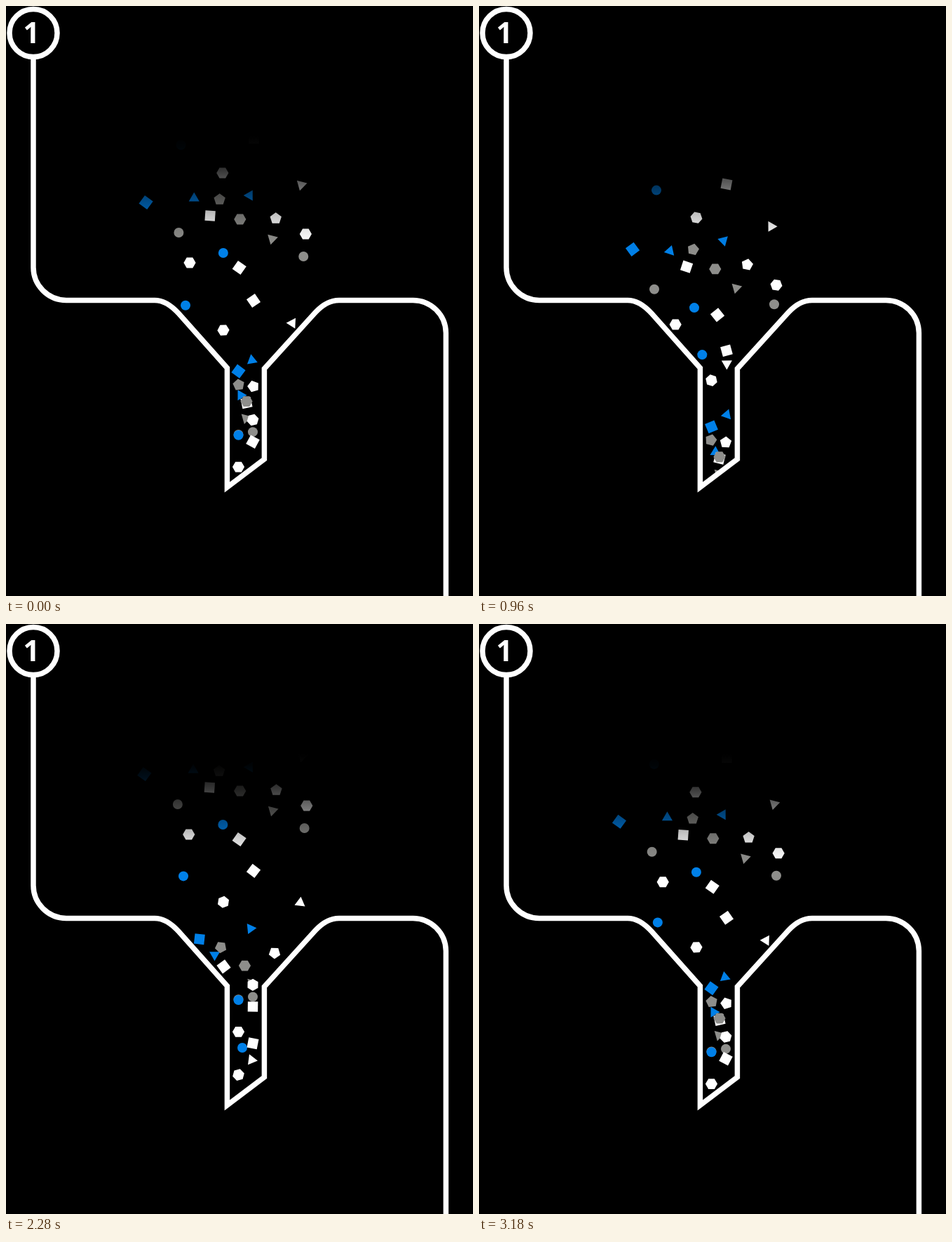
These frames come from a looping animation (666x841 px, 3.24 s). An HTML page with a canvas:

```html
<!DOCTYPE html>
<html lang="en">
<head>
<meta charset="utf-8">
<title>Funnel</title>
<style>
  html, body { margin: 0; width: 100%; height: 100%; overflow: hidden; background: #000; }
  canvas { display: block; }
</style>
</head>
<body>
<canvas id="stage" width="666" height="841"></canvas>
<script>
const ctx = document.getElementById('stage').getContext('2d');
const STEP = 60, STEPS = 54;
const WHITE = '#fff', BLUE = '#0080e8', GRAY = '#8e8e8b';

const circle = { sides: 0, r: 7, angle: 0 };
const tri = { sides: 3, r: 8.7, angle: 104 };
const square = { sides: 4, r: 10.2, angle: 45 };
const penta = { sides: 5, r: 8.6, angle: -90 };
const hexa = { sides: 6, r: 8.6, angle: 0 };

// Speeds are in pixels per step, spin in degrees per step.
const START = 7, END = 112;       // shapes drift in until START, then fall and spin
const ENTRY = 3.57, RISE = 4.55;  // speed just before START and earlier
const NECK = 510, FLOW = 4.95;    // top of the spout and the speed inside it
const GAP = 20;                   // clearance from the sloping walls
const LEFT = 331.5, INNER = 337, MID = 343, RIGHT = 352;

const wallLeft = y => 246 + (y - 438) * 0.885;
const wallRight = y => 441 - (y - 436) * 0.901;
const clamp = (v, lo, hi) => Math.max(lo, Math.min(hi, v));

// Fall freely, slide along a wall when touching it, then flow down a lane.
function trace(d) {
  let { x, y } = d;
  const path = [];
  for (let u = START; u <= END; u++) {
    path.push({ x, y });
    x += (d.lane - x) * d.drift;
    const free = x;
    x = clamp(x, Math.min(d.lane, wallLeft(y) + GAP), Math.max(d.lane, wallRight(y) - GAP));
    y += y > NECK ? FLOW : x !== free ? d.slide : d.fall;
    x = clamp(x, Math.min(d.lane, wallLeft(y) + GAP), Math.max(d.lane, wallRight(y) - GAP));
  }
  return path;
}

const drops = [];
function drop(shape, color, x, y, lane, fall, options) {
  const d = { ...shape, color, x, y, lane, fall, spin: 0, slide: 4, drift: 0, ...options };
  d.path = trace(d);
  drops.push(d);
}

drop(circle, BLUE, 253, 223, INNER, 4.4, { slide: 5.2 });
drop(square, WHITE, 353, 214, RIGHT, 4.45, { spin: 1.2 });
drop(hexa, WHITE, 310, 263, LEFT, 4.3, { spin: 1.25, slide: 4.9 });
drop(tri, WHITE, 419, 281, RIGHT, 3.7, { spin: 1.7 });
drop(tri, BLUE, 345, 295, RIGHT, 4.5, { spin: 1.75, angle: 60, drift: 0.05 });
drop(tri, BLUE, 271, 297, INNER, 5.7, { spin: 1.95, angle: 30, slide: 3.3 });
drop(square, BLUE, 205, 305, LEFT, 4.65, { spin: 1.95, angle: 81, slide: 3.6, drift: 0.013 });
drop(penta, GRAY, 306, 300, LEFT, 5.2, { spin: 1.4 });
drop(square, WHITE, 293, 324, MID, 5.3, { spin: 1.6, angle: 49, slide: 3.8, drift: 0.007 });
drop(hexa, GRAY, 334, 329, MID, 5.1, { drift: 0.04 });
drop(penta, WHITE, 383, 327, RIGHT, 4.6, { spin: 1.2 });
drop(circle, GRAY, 250, 348, LEFT, 6.2, { slide: 4.5 });
drop(tri, GRAY, 379, 358, MID, 5, { drift: 0.04 });
drop(hexa, WHITE, 424, 350, RIGHT, 5.3, { spin: 1, slide: 4.4 });
drop(circle, GRAY, 421, 382, RIGHT, 4.8, { slide: 4.6 });
drop(circle, BLUE, 311, 377, LEFT, 5.9, { slide: 3.5, drift: -0.02 });
drop(hexa, WHITE, 265, 391, LEFT, 7, { slide: 5.1 });
drop(square, WHITE, 333, 398, RIGHT, 4.7, { spin: 1.8, angle: 80, drift: 0.05 });

function place(d, u) {
  const wait = START - u;
  if (wait > 0) {
    const spread = (d.x - 340) * 0.04 * Math.min(wait, 10) / START;
    return [d.x + spread, d.y - Math.min(wait, START) * ENTRY - Math.max(0, -u) * RISE];
  }
  const i = Math.min(Math.floor(-wait), d.path.length - 2), k = -wait - i;
  const a = d.path[i], b = d.path[i + 1];
  return [a.x + (b.x - a.x) * k, a.y + (b.y - a.y) * k];
}

function polygon(n, r, deg, x, y) {
  const xs = [], ys = [];
  for (let i = 0; i < n; i++) {
    const a = deg * Math.PI / 180 + i * 2 * Math.PI / n;
    xs.push(r * Math.cos(a));
    ys.push(r * Math.sin(a));
  }
  const mid = v => (Math.min(...v) + Math.max(...v)) / 2;
  const dx = x - mid(xs), dy = y - mid(ys);
  xs.forEach((px, i) => ctx.lineTo(px + dx, ys[i] + dy));
  ctx.closePath();
}

function drawDrop(d, u) {
  const [x, y] = place(d, u);
  if (y < 140 || y > 710) return;
  ctx.fillStyle = d.color;
  ctx.beginPath();
  if (d.sides) polygon(d.sides, d.r, d.angle + d.spin * Math.max(0, u - START), x, y);
  else ctx.arc(x, y, d.r, 0, 2 * Math.PI);
  ctx.fill();
}

// Shade from black to clear with a smooth S-curve.
const FADE_TOP = 185, FADE_END = 350;
const fade = ctx.createLinearGradient(0, FADE_TOP, 0, FADE_END);
for (let i = 0; i <= 10; i++) {
  const k = i / 10;
  fade.addColorStop(k, `rgba(0,0,0,${1 - k * k * (3 - 2 * k)})`);
}

const pipe = new Path2D(
  'M39 72 V372 A47 47 0 0 0 86 419.4 H212 C225 419.4 236 427 246 438 L315.4 516 V686 ' +
  'L368.4 646 V517 L441 437 C451 426 462 419.4 475 419.4 H580 A47 47 0 0 1 627.4 466 V850');
const inside = new Path2D('M0 0 H666 V646 H368 L315 686 H0 Z');

function drawFrame() {
  ctx.strokeStyle = ctx.fillStyle = WHITE;
  ctx.lineWidth = 7.5;
  ctx.stroke(pipe);
  ctx.beginPath();
  ctx.arc(39, 38.5, 34, 0, 2 * Math.PI);
  ctx.stroke();
  ctx.font = '700 41px "Open Sans", "Noto Sans", sans-serif';
  ctx.textAlign = 'center';
  ctx.fillText('1', 36.3, 53);
}

const NEXT_ENTERS = 34;   // step at which the following generation appears

function draw(step) {
  ctx.fillStyle = '#000';
  ctx.fillRect(0, 0, 666, 841);
  ctx.save();
  ctx.clip(inside);
  const ages = [step, step + 53.3];
  if (step >= NEXT_ENTERS) ages.push(step - 52.5);
  for (const u of ages)
    for (const d of drops) drawDrop(d, u);
  ctx.restore();
  ctx.fillStyle = fade;
  ctx.fillRect(150, 100, 350, FADE_END - 100);
  drawFrame();
}

const start = performance.now();
function tick() {
  const t = Math.max(0, performance.now() - start);
  draw(Math.floor(t / STEP) % STEPS);
  requestAnimationFrame(tick);
}
tick();
</script>
</body>
</html>
```
